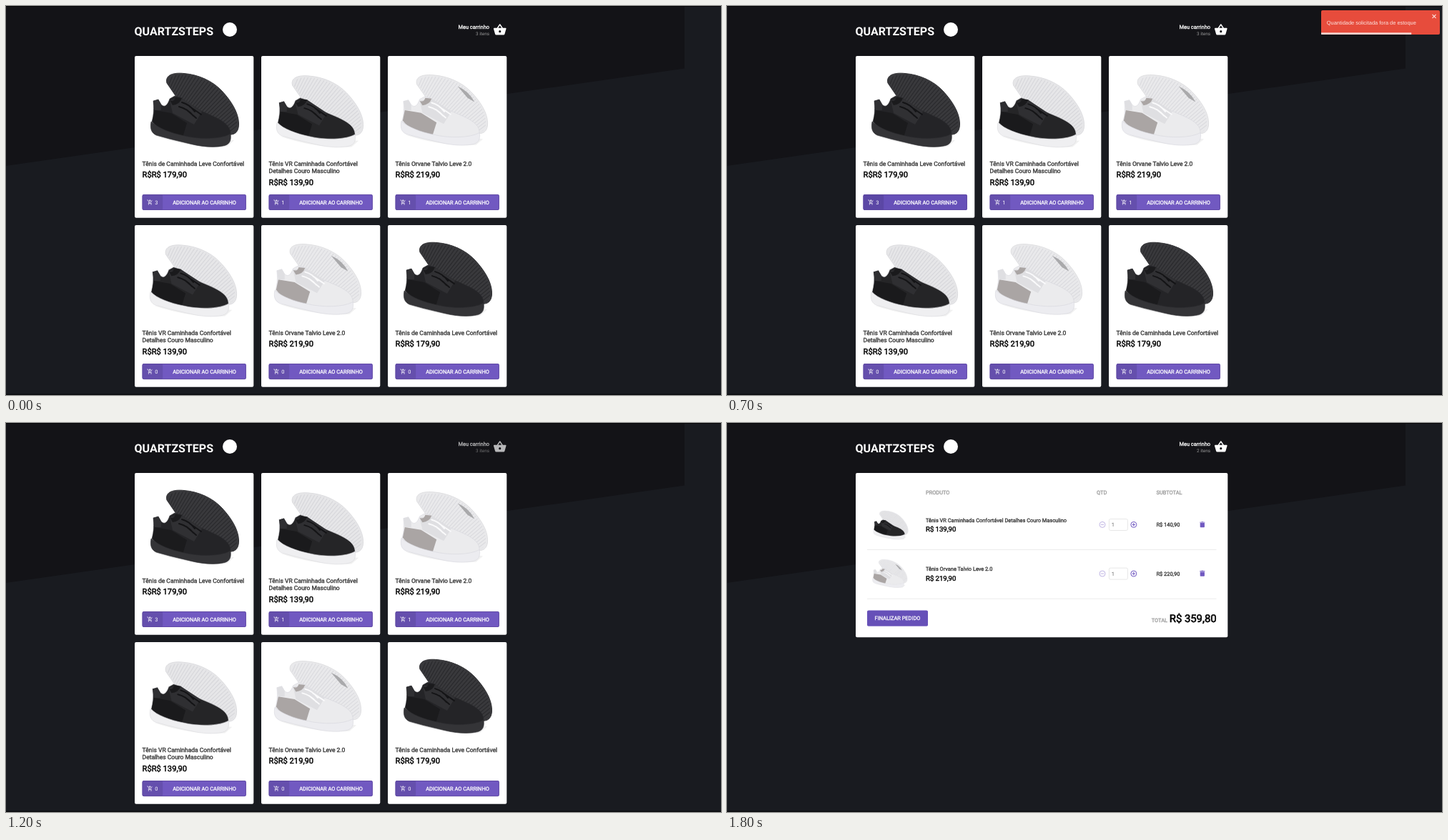
Recreate the animation shown at these times as an HTML page. Size 1000 by 545 pixels, loop 2000 ms.

```html
<!DOCTYPE html>
<html lang="pt-BR">
<head>
<meta charset="utf-8">
<title>Loja de tênis</title>
<style>
html, body { margin: 0; height: 100%; overflow: hidden; background: #191b20; }
svg { display: block; }
#stage { width: 100vw; height: 100vh; font-family: Roboto, sans-serif; text-rendering: geometricPrecision; }
.b { stroke: currentColor; stroke-width: .04em; fill: currentColor; }
.n { fill: currentColor; }

.dark  { --up: #242427; --heel: #1b1b1d; --strap: #303033; --lace: #141416; --sole: #343437; --rim: #2b2b2e; --back: #39393c; --groove: #29292c; --edge: #303033; --patch: none; }
.mixed { --up: #252527; --heel: #1a1a1c; --strap: #2f2f32; --lace: #141416; --sole: #efeff1; --rim: #d9d9dd; --back: #e6e6e8; --groove: #d6d6da; --edge: #dcdcdf; --patch: none; }
.light { --up: #ebebed; --heel: #aaa5a4; --strap: #dfdfe2; --lace: #fafafb; --sole: #ececf0; --rim: #d6d6dc; --back: #e9e9eb; --groove: #dadade; --edge: #dedee1; --patch: #a9a9ab; }

/* Screen changes are hard cuts on a two second clock */
.shop, .cart3, .cart2, .three, .two, .hover, .toast, .link, .pay { animation: 2s step-end infinite; }
.shop  { animation-name: shop; }
.cart3 { animation-name: cart3; }
.cart2, .two { animation-name: cart2; }
.three { animation-name: three; }
.hover { animation-name: hover; }
.toast { animation-name: toast; }
.link  { animation-name: link; }
.pay   { animation-name: pay; }
.bar   { transform-origin: 831px 0; animation: bar 2s infinite; }
@keyframes shop  { 0% { opacity: 1 } 70%, to { opacity: 0 } }
@keyframes cart3 { 0% { opacity: 0 } 70% { opacity: 1 } 80%, to { opacity: 0 } }
@keyframes cart2 { 0% { opacity: 0 } 80%, to { opacity: 1 } }
@keyframes three { 0% { opacity: 1 } 80%, to { opacity: 0 } }
@keyframes hover { 0% { opacity: 0 } 20% { opacity: 1 } 45%, to { opacity: 0 } }
@keyframes toast { 0% { opacity: 0 } 35% { opacity: 1 } 60%, to { opacity: 0 } }
@keyframes link  { 0% { opacity: 1 } 60% { opacity: .7 } 70%, to { opacity: 1 } }
@keyframes pay   { 0% { opacity: 0 } 90%, to { opacity: 1 } }
@keyframes bar {
  0% { transform: scaleX(.76); animation-timing-function: step-end }
  35% { transform: scaleX(.76); animation-timing-function: steps(5, end) }
  60%, to { transform: scaleX(-.067) }
}
</style>
</head>
<body>
<svg id="stage" viewBox="0 0 1000 545" preserveAspectRatio="none">
  <defs>
    <path id="outsole" d="M28 28C25 16 38 13 52 14.500C72 16 92 25 105 39C118 53 128 69 128.500 84C129 95 124 101 115 100C93 98 65 72 43 50Z"/>
    <clipPath id="inside"><use href="#outsole" transform="translate(4 3) scale(.95)"/></clipPath>
    <g id="shoe">
      <path d="M12 102Q60 119 112 117L122 108Z" fill="#f1f1f1"/>
      <use href="#outsole" style="fill:var(--back);stroke:var(--edge)"/>
      <g clip-path="url(#inside)">
        <path d="M28 14Q80 32 130 98" fill="none" stroke-width="56" stroke-dasharray="1.100 3" style="stroke:var(--groove)"/>
      </g>
      <path d="M86 31Q102 38 110 54L100 48Z" style="fill:var(--patch)"/>
      <path d="M9 53L16 51L20 58C25 63 29 59 32 50L39 46L49 49C57 56 66 60 74 66C87 72 101 77 109 84C115 89 117 94 117 100C103 111 73 110 53 104C33 100 16 92 7 82C10 72 10 62 9 53Z" style="fill:var(--up);stroke:var(--rim);stroke-width:.6"/>
      <path d="M11 66L34 70L56 84L50 104C30 100 15 92 8 81Z" style="fill:var(--heel)"/>
      <path d="M9 53L16 51L20 58L20 66L11 66ZM32 52L49 49L77 68L66 86L36 70Z" style="fill:var(--strap)"/>
      <path d="M49 55Q60 58 67 68M45 61Q57 64 65 74M60 61L76 72M55 65L69 77" fill="none" stroke-width="2" stroke-linecap="round" style="stroke:var(--lace)"/>
      <path d="M32 52Q38 55 40 48L49 49Q46 58 36 59Z" style="fill:var(--heel)"/>
      <path d="M6 82C4 93 7 98 13 101L33 106.500L62 113.500C80 118 98 118.500 109 115.500C117 113 118 107 117 99C103 107 73 107 53 102C33 98 16 91 6 82Z" style="fill:var(--sole);stroke:var(--rim);stroke-width:.6"/>
    </g>
    <g id="add" fill="none" stroke="#fff" stroke-width="2">
      <path d="M1 3H4L8.500 12H16L20.500 4M8.500 12L6 16H19M12 1V9M8 5H16"/>
      <circle cx="7" cy="20" r="1"/><circle cx="17" cy="20" r="1"/>
    </g>
    <path id="basket" fill="#fff" fill-rule="evenodd" d="M17.200 9L12.800 2.400Q12 1.600 11.200 2.400L6.800 9H2Q.8 9 1 10.300L3.600 19.500Q4 21 5.500 21H18.500Q20 21 20.400 19.500L23 10.300Q23.200 9 22 9ZM9 9L12 4.600L15 9ZM12 17a2 2 0 1 1 0-4a2 2 0 1 1 0 4Z"/>
    <g id="ring" fill="none" stroke="#7159c1"><circle r="4"/><path d="M-2.200 0H2.200"/></g>
    <path id="bin" fill="#7159c1" d="M-3.100-2.100H3.100V3.200Q3.100 4 2.200 4H-2.200Q-3.100 4-3.100 3.200ZM-3.600-3.500H-1.600L-1.100-4H1.100L1.600-3.500H3.600V-2.600H-3.600Z"/>
  </defs>
</svg>
<script>
const SMALL = 7.43, VIOLET = '#7159c1', HOVER = '#6650b8';

const products = [
  { look: 'dark', fit: '', lines: ['Tênis de Caminhada Leve Confortável'], price: '179,90', sub: '182,90', qty: 3 },
  { look: 'mixed', fit: 'translate(-1 4) scale(.985 .97)', lines: ['Tênis VR Caminhada Confortável', 'Detalhes Couro Masculino'], price: '139,90', sub: '140,90', qty: 1 },
  { look: 'light', fit: 'translate(-4 3) scale(.985 .955)', lines: ['Tênis Orvane Talvio Leve 2.0'], price: '219,90', sub: '220,90', qty: 1 }
];

const text = (x, y, size, color, str, cls = 'b', anchor = 'start') =>
  `<text class="${cls}" x="${x}" y="${y}" font-size="${size}" color="${color}" text-anchor="${anchor}">${str}</text>`;
const rect = (x, y, w, h, fill, r = 0, more = '') =>
  `<rect x="${x}" y="${y}" width="${w}" height="${h}" rx="${r}" fill="${fill}" ${more}/>`;
const at = (x, y, body, scale = 1) => `<g transform="translate(${x} ${y}) scale(${scale})">${body}</g>`;
const shoe = p => `<use href="#shoe" class="${p.look}" transform="${p.fit}"/>`;

function card(p, i, qty) {
  const extra = (p.lines.length - 1) * 10.6;
  return at(180 + i % 3 * 177, 70 + Math.floor(i / 3) * 237.1,
    rect(0, 0, 166.3, 226.7, '#fff', 2) +
    at(17, 10, shoe(p)) +
    p.lines.map((line, k) => text(10.6, 153.8 + k * 10.6, 8.49, '#333', line)).join('') +
    text(10.6, 170.2 + extra, 11.15, '#000', 'R$R$ ' + p.price) +
    rect(10.6, 194, 145.2, 22, VIOLET, 2) +
    (i ? '' : rect(10.6, 194, 145.2, 22, HOVER, 2, 'class="hover"')) +
    rect(10.6, 194, 28.6, 22, 'rgba(0,0,0,.1)', 2) +
    rect(11, 194.4, 144.4, 21.2, 'none', 2, 'stroke="#5d489f" stroke-width=".8"') +
    at(17, 200.8, '<use href="#add"/>', .354) +
    text(28.3, 207.9, SMALL, '#fff', qty, 'n') +
    text(97.5, 207.7, SMALL, '#fff', 'ADICIONAR AO CARRINHO', 'b', 'middle'));
}

function row(p, i) {
  const plus = '<use href="#ring"/><path d="M0-2.200V2.200" stroke="#7159c1"/>';
  return at(0, i * 68.65,
    at(203, 116, shoe(p), .4) +
    text(278, 138.6, SMALL, '#333', p.lines.join(' ')) +
    text(278, 152, 9.56, '#000', 'R$ ' + p.price) +
    at(525, 142.4, `<use href="#ring" opacity="${p.qty > 1 ? 1 : .45}"/>`) +
    rect(534.4, 134.5, 26, 16, '#fff', 2, 'stroke="#ddd" stroke-width=".7"') +
    text(537.8, 145.4, SMALL, '#666', p.qty, 'n') +
    at(568.8, 142.4, plus) +
    text(600.5, 145.4, SMALL, '#333', 'R$ ' + p.sub) +
    at(664.8, 142.2, '<use href="#bin"/>') +
    rect(196, 177.2, 488.500, .7, '#e4e4e4'));
}

function cart(items, total, cls) {
  const drop = (items.length - 3) * 68.65;
  const heads = [[278, 'PRODUTO'], [517, 'QTD'], [600.5, 'SUBTOTAL']];
  return `<g class="${cls}">` +
    rect(180, 70, 520.3, 298.8 + drop, '#fff', 2) +
    heads.map(([x, s]) => text(x, 100.2, SMALL, '#999', s)).join('') +
    items.map(row).join('') +
    at(0, drop,
      rect(196, 331.5, 85, 21.6, VIOLET, 2) +
      (items.length < 3 ? rect(196, 331.5, 85, 21.6, HOVER, 2, 'class="pay"') : '') +
      text(238.5, 345, SMALL, '#fff', 'FINALIZAR PEDIDO', 'b', 'middle') +
      text(593.7, 347.3, SMALL, '#999', 'TOTAL') +
      text(684.6, 347.2, 14.87, '#000', 'R$ ' + total, 'b', 'end')) + '</g>';
}

const backdrop = rect(0, 0, 1000, 545, '#191b20') +
  '<path d="M0 0H949V87.500L0 224Z" fill="#131317"/>' +
  rect(0, 0, 1000, 1, '#050507') + rect(0, 543.5, 1000, 1.5, '#0b0c0f');

const header =
  '<text x="179.500" y="41.300" font-size="16" font-weight="700" fill="#fff">QUARTZSTEPS</text>' +
  '<circle cx="313" cy="33" r="10" fill="#fff"/>' +
  '<g class="link">' +
  text(676, 32, SMALL, '#fff', 'Meu carrinho', 'b', 'end') +
  text(676, 41, 6.37, '#999', '3 itens', 'n three', 'end') +
  text(676, 41, 6.37, '#999', '2 itens', 'n two', 'end') +
  at(681.2, 23.7, '<use href="#basket"/>', .796) + '</g>';

const toast = '<g class="toast" font-family="Liberation Sans, Arial, sans-serif">' +
  rect(831, 6, 166, 34, '#e74c3c', 2) +
  text(838.8, 25.6, SMALL, '#fbe3e0', 'Quantidade solicitada fora de estoque', 'n') +
  '<path d="M986.500 12L991.500 17M991.500 12L986.500 17" stroke="#fbdad6" stroke-width="1.100"/>' +
  rect(831, 37.3, 166, 2.7, 'rgba(255,255,255,.75)', 0, 'class="bar"') + '</g>';

const grid = [0, 1, 2, 1, 2, 0]
  .map((k, i) => card(products[k], i, i < 3 ? products[k].qty : 0)).join('');

document.getElementById('stage').insertAdjacentHTML('beforeend',
  backdrop + header + `<g class="shop">${grid}</g>` +
  cart(products, '899,50', 'cart3') + cart(products.slice(1), '359,80', 'cart2') + toast);
</script>
</body>
</html>
```
